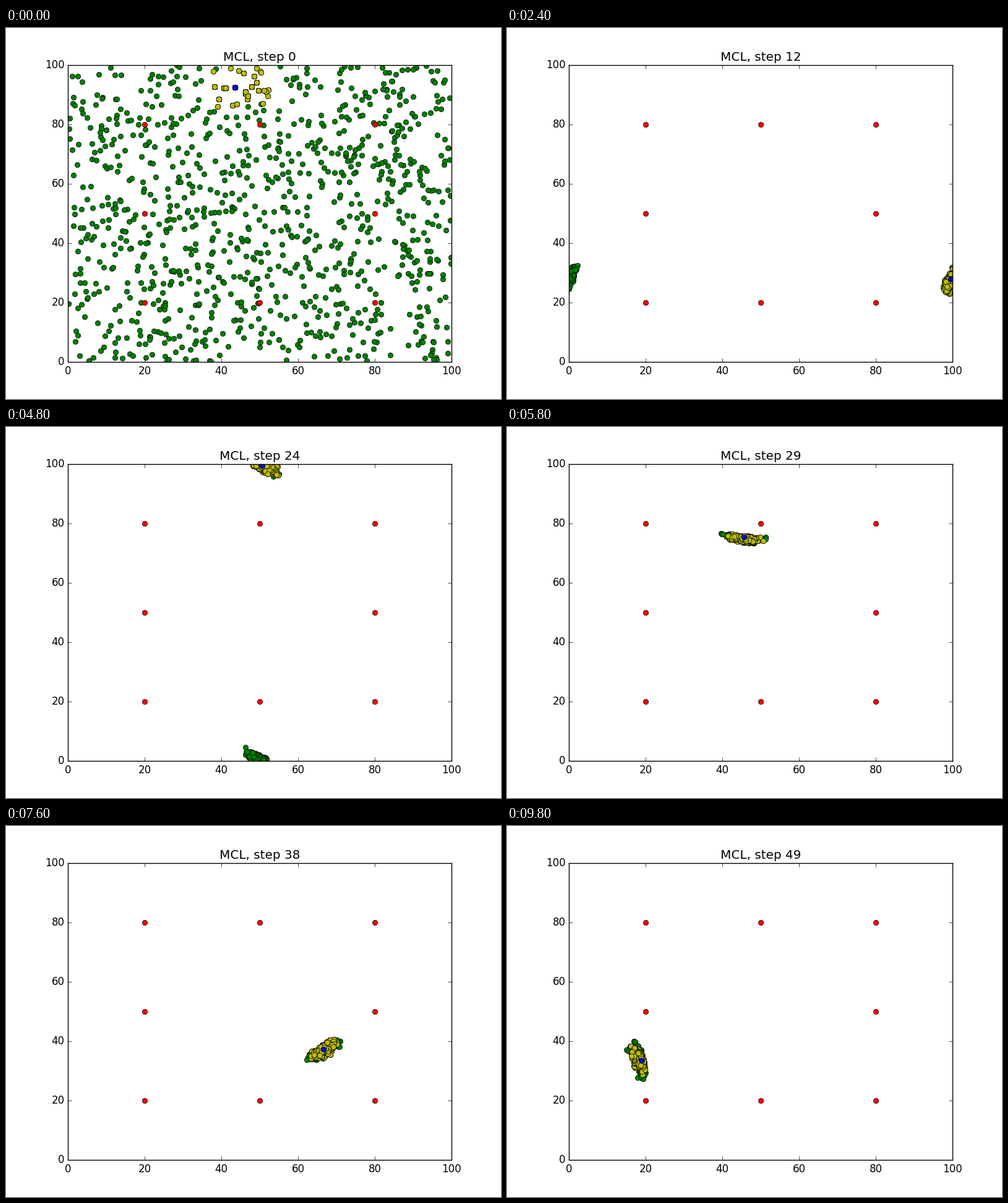
These frames come from a looping animation (800x600 px, 10 s). A matplotlib script:

```python
from itertools import product

import numpy as np
import matplotlib.pyplot as plt
from matplotlib.animation import FuncAnimation

STEPS, COUNT, WORLD = 50, 1000, 100.0
TURN, SPEED = 0.1, 5.0
TURN_NOISE, MOVE_NOISE, SENSE_NOISE = 0.05, 0.05, 5.0
START = np.array([[43.55, 92.4, 1.814]])  # x, y, heading
MARKS = np.array([p for p in product((20, 50, 80), repeat=2) if p != (50, 50)])

rng = np.random.default_rng(7)


def move(poses, turn_noise=0.0, move_noise=0.0):
    n = len(poses)
    angle = poses[:, 2] + TURN + rng.normal(0, 1, n) * turn_noise
    dist = SPEED + rng.normal(0, 1, n) * move_noise
    x = (poses[:, 0] + dist * np.cos(angle)) % WORLD
    y = (poses[:, 1] + dist * np.sin(angle)) % WORLD
    return np.column_stack([x, y, angle])


def sense(poses):
    return np.linalg.norm(poses[:, None, :2] - MARKS, axis=2)


def resample(poses, robot):
    """Draw particles in proportion to how well they explain the ranges."""
    error = sense(poses) - sense(robot)
    score = -(error ** 2).sum(axis=1) / (2 * SENSE_NOISE ** 2)
    weight = np.exp(score - score.max())
    return poses[rng.choice(len(poses), COUNT, p=weight / weight.sum())]


def simulate():
    robot = START
    cloud = rng.uniform(0, 1, (COUNT, 3)) * (WORLD, WORLD, 2 * np.pi)
    cloud[0] = START[0]  # one good guess keeps the filter on track
    history = []
    for _ in range(STEPS):
        kept = resample(cloud, robot)
        history.append((cloud, kept, robot))
        robot = move(robot)
        cloud = move(kept, TURN_NOISE, MOVE_NOISE)
    return history


history = simulate()

plt.rcParams.update({
    "font.family": "DejaVu Sans", "font.size": 12,
    "axes.linewidth": 1.0, "axes.axisbelow": False, "axes.titlepad": 5,
    "lines.markersize": 6, "lines.markeredgewidth": 0.5,
    "ytick.alignment": "center", "xtick.top": True, "ytick.right": True,
})
for axis in ("xtick", "ytick"):
    plt.rcParams.update({
        f"{axis}.direction": "in", f"{axis}.major.size": 4,
        f"{axis}.major.width": 0.5, f"{axis}.major.pad": 4,
    })

fig = plt.figure(figsize=(8, 6), dpi=100, facecolor="white")
ax = fig.add_axes([0.125, 0.1, 0.775, 0.8])
ticks = range(0, 101, 20)
ax.set(xlim=(0, WORLD), ylim=(0, WORLD), xticks=ticks, yticks=ticks)
title = ax.set_title("", fontsize=14.4)


def dots(color):
    return ax.plot([], [], "o", color=color, markeredgecolor="black")[0]


layers = [dots(color) for color in "gyb"]
dots("r").set_data(*MARKS.T)


def draw(step):
    for layer, poses in zip(layers, history[step]):
        layer.set_data(poses[:, 0], poses[:, 1])
    title.set_text(f"MCL, step {step}")
    return [*layers, title]


anim = FuncAnimation(fig, draw, frames=STEPS, init_func=lambda: draw(0),
                     interval=200, repeat=True, repeat_delay=0, blit=False)
plt.show()
```
